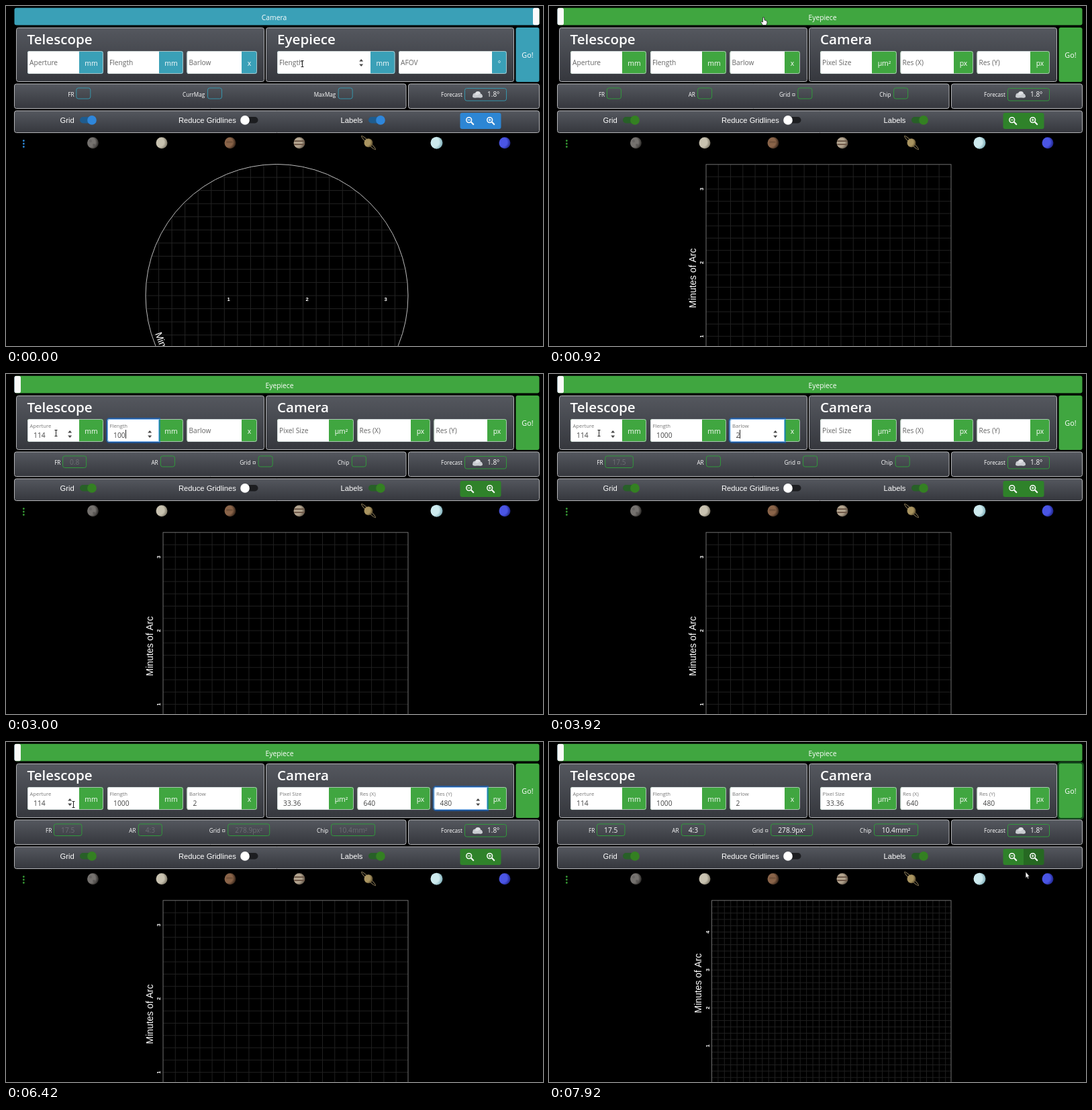
Animation, 800 px wide and 506 px high, one loop 8000 ms. Source, as an HTML page with a canvas:

```html
<!DOCTYPE html>
<html lang="en">
<head>
<meta charset="utf-8">
<title>Telescope calculator</title>
<style>
  html, body { margin: 0; width: 100%; height: 100%; overflow: hidden; background: #000; }
  canvas { display: block; width: 800px; height: 506px; }
</style>
</head>
<body>
<canvas id="stage" width="800" height="506"></canvas>
<script>
const ctx = document.getElementById('stage').getContext('2d');
const LOOP = 8000, STEP = 1000 / 12;
const SWITCH = 466, GO = 7080;
const UI = '"Open Sans", "Noto Sans", sans-serif';
const ARIAL = '"Liberation Sans", Arial, sans-serif';
const TEAL = [58, 160, 183], GREEN = [64, 166, 64];
const BLUE = [45, 134, 212], LEAF = [47, 130, 42];

// focus: [from, to]; typing starts at `start`, one key every `step` ms
const telescope = [
  { x: 32, mid: 109, end: 145, label: 'Aperture', unit: 'mm', text: '114', start: 1900, step: 170, focus: [1500, 2560] },
  { x: 151, mid: 228, end: 264, label: 'Flength', unit: 'mm', text: '1000', start: 2720, step: 130, focus: [2570, 3440] },
  { x: 269.5, mid: 351, end: 374, label: 'Barlow', unit: 'x', text: '2', start: 3720, step: 0, focus: [3450, 4090] }
];
const eyepiece = [
  { x: 404, mid: 543, end: 579.5, label: 'Flength', unit: 'mm' },
  { x: 585, mid: 724, end: 746, label: 'AFOV', unit: '°' }
];
const camera = [
  { x: 404, mid: 481, end: 518, label: 'Pixel Size', unit: 'µm²', text: '33.36', start: 4300, step: 130, focus: [4100, 4990] },
  { x: 523.5, mid: 603, end: 632, label: 'Res (X)', unit: 'px', text: '640', start: 5170, step: 125, focus: [5000, 5540] },
  { x: 637.5, mid: 717, end: 746, label: 'Res (Y)', unit: 'px', text: '480', start: 5650, step: 130, focus: [5550, GO] }
];
// time, x, y
const path = [
  [0, 441, 86], [90, 441, 86], [420, 347, 15], [800, 347, 15], [1330, 74, 88],
  [6340, 74, 88], [6420, 100, 93], [6950, 775, 74], [7420, 775, 78], [7800, 722, 172], [7900, 710, 193], [8001, 710, 193]
];

const clamp = v => Math.max(0, Math.min(1, v));
const ramp = (t, from, dur) => clamp((t - from) / dur);
const ease = u => u < .5 ? 2 * u * u : 1 - 2 * (1 - u) * (1 - u);
const rgb = c => `rgb(${c.map(Math.round)})`;
const mix = (a, b, k) => a.map((v, i) => v + (b[i] - v) * k);
const darken = (c, k) => c.map(v => v * k);
const inside = ([x, y], l, t, r, b) => x >= l && x <= r && y >= t && y <= b;

function pointer(t) {
  t = Math.max(0, t);
  const i = path.findIndex((p, n) => n + 1 < path.length && t < path[n + 1][0]);
  const [t0, x0, y0] = path[i], [t1, x1, y1] = path[i + 1];
  const k = ease((t - t0) / (t1 - t0));
  return [x0 + (x1 - x0) * k, y0 + (y1 - y0) * k];
}

function text(s, x, y, size, color = '#fff', align = 'left', font = UI, weight = 400) {
  ctx.font = `${weight} ${size}px ${font}`;
  ctx.textAlign = align;
  ctx.fillStyle = color;
  ctx.fillText(s, x, y);
}

function box(l, t, r, b, radius, fill, stroke, width = 1) {
  ctx.beginPath();
  ctx.roundRect(l, t, r - l, b - t, radius);
  if (fill) { ctx.fillStyle = fill; ctx.fill(); }
  if (stroke) { ctx.strokeStyle = stroke; ctx.lineWidth = width; ctx.stroke(); }
}

function line(x0, y0, x1, y1) {
  ctx.beginPath();
  ctx.moveTo(x0, y0);
  ctx.lineTo(x1, y1);
  ctx.stroke();
}

function disc(x, y, r, fill) {
  ctx.beginPath();
  ctx.arc(x, y, r, 0, 7);
  ctx.fillStyle = fill;
  ctx.fill();
}

function poly(points, fill, stroke) {
  ctx.beginPath();
  points.forEach(p => ctx.lineTo(...p));
  ctx.closePath();
  ctx.fillStyle = fill;
  ctx.fill();
  if (stroke) { ctx.strokeStyle = stroke; ctx.lineWidth = .8; ctx.stroke(); }
}

function turned(s, x, y, size, weight) {
  ctx.save();
  ctx.translate(x, y);
  ctx.rotate(-Math.PI / 2);
  text(s, 0, 0, size, '#fff', 'center', ARIAL, weight);
  ctx.restore();
}

function panel(l, t, r, b) {
  const g = ctx.createLinearGradient(0, t, 0, b);
  g.addColorStop(0, '#55585f');
  g.addColorStop(1, '#35373d');
  box(l + .5, t + .5, r - .5, b - .5, 3, g, '#b4b5b8');
}

function topBar(t, hover) {
  ctx.save();
  ctx.beginPath();
  ctx.roundRect(12.5, 2.7, 782, 25.8, 3);
  ctx.clip();
  ctx.translate(-781 * ease(ramp(t, SWITCH, 400)), 0);
  const shade = hover ? .81 : 1;
  ctx.fillStyle = rgb(darken(TEAL, shade));
  ctx.fillRect(12, 2, 783, 27);
  ctx.fillStyle = rgb(GREEN);
  ctx.fillRect(794, 2, 783, 27);
  text('Camera', 399.5, 20.5, 10.3, '#fff', 'center');
  text('Eyepiece', 1188.5, 20.5, 10.3, '#fff', 'center');
  box(785, 2.7, 803, 28.5, 3, '#fafafa');
  ctx.restore();
}

const typed = (f, t) => f.text && t >= f.start
  ? f.text.slice(0, f.step ? 1 + Math.floor((t - f.start) / f.step) : 1) : '';

function field(f, t, accent, mouse) {
  const value = typed(f, t);
  const focused = f.focus && t >= f.focus[0] && t < f.focus[1];
  box(f.x, 67, f.end, 101, 3, accent);
  box(f.x, 67, f.mid, 101, [3, 0, 0, 3], '#fff');
  box(f.x + .5, 67.5, f.end - .5, 100.5, 3, null, '#c4d0d0', .8);
  text(f.unit, (f.mid + f.end) / 2, 88.5, 10.4, '#fff', 'center');
  if (focused) {
    box(f.x - 1, 66, f.mid + 1, 102, [4, 0, 0, 4], null, 'rgba(0, 110, 240, .45)', 2);
    box(f.x + .5, 67.5, f.mid - .5, 100.5, [3, 0, 0, 3], null, '#80b8f4');
  }
  const lift = value ? 5 : 0;
  if (value) {
    text(f.label, f.x + 3.5, 79.5, 7.7, '#777');
    text(value, f.x + 9, 94.7, 10.3, '#444');
  } else {
    text(f.label, f.x + 3, 88.4, 10.2, '#666');
  }
  if (focused) {
    const keys = value ? f.start + (value.length - 1) * f.step : f.focus[0];
    if ((t - keys) % 1000 < 500) {
      ctx.font = `400 10.3px ${UI}`;
      ctx.fillStyle = '#222';
      ctx.fillRect(Math.round(f.x + 9 + ctx.measureText(value).width), 78 + lift, 1, 13);
    }
  }
  if (focused || inside(mouse, f.x, 67, f.mid, 101)) {
    const x = f.mid - 13.8, y = 84.5 + lift;
    poly([[x - 3, y - 2], [x, y - 5.5], [x + 3, y - 2]], '#444');
    poly([[x - 3, y + 2], [x, y + 5.5], [x + 3, y + 2]], '#444');
  }
}

// each stat: label, box offset, value, value width
function stats(t, accent) {
  let list;
  if (t < SWITCH) {
    list = [['FR', 12, '', 0], ['CurrMag', 37, '', 0], ['MaxMag', 36, '', 0]];
  } else {
    const flength = +typed(telescope[1], t), barlow = +typed(telescope[2], t) || 1;
    const ratio = flength ? (Math.floor(flength * barlow / 11.4) / 10).toFixed(1) : '';
    const full = typed(camera[2], t).length === 3;
    list = [
      ['FR', 12, ratio, ratio.length > 3 ? 20.5 : ratio ? 14 : 0],
      ['AR', 13.5, full ? '4:3' : '', 14],
      ['Grid ▫', 27.5, full ? '278.9px²' : '', 41],
      ['Chip', 21, full ? '10.4mm²' : '', 44]
    ];
  }
  list.forEach(s => { s.width = s[1] + 22 + (s[2] ? s[3] : 0); });
  const gap = (561 - list.reduce((sum, s) => sum + s.width, 0)) / list.length;
  let x = 24 + gap / 2;
  for (const s of list) {
    if (s[0] === 'Grid ▫') {
      text('Grid', x, 134.5, 8.2);
      ctx.strokeStyle = '#ddd';
      ctx.lineWidth = .8;
      ctx.strokeRect(x + 20, 130.5, 3.2, 3.2);
    } else text(s[0], x, 134.5, 8.2);
    const l = x + s[1], r = x + s.width;
    box(l + .5, 122, r - .5, s[2] ? 139.5 : 138, 3, null, accent);
    text(s[2], (l + r) / 2, 135.2, 10.2, t < GO ? '#6c6f74' : '#fff', 'center');
    x += s.width + gap;
  }
}

function forecast(accent) {
  text('Forecast', 648, 134.5, 8.1);
  box(683.5, 122.5, 745.5, 141, 3, null, accent);
  disc(699, 133, 3.6, '#c9ccd0');
  disc(703, 131, 4, '#dfe1e4');
  disc(706.5, 133.5, 3, '#c9ccd0');
  box(695, 132.5, 710, 136.5, 2, '#c9ccd0');
  text('1.8°', 717, 135.3, 10, '#fff');
}

function toggle(x, track, knob, on) {
  box(x, 165, x + 24, 174.5, 4.7, track);
  disc(x + (on ? 18 : 4.5), 169.9, 6.8, knob);
}

function magnifier(x, plus) {
  ctx.strokeStyle = '#fff';
  ctx.lineWidth = 1.5;
  ctx.beginPath();
  ctx.arc(x - 1.3, 169.6, 3.9, 0, 7);
  ctx.stroke();
  ctx.lineWidth = 2;
  line(x + 2, 172.8, x + 5.8, 176.7);
  ctx.lineWidth = 1;
  line(x - 3.3, 169.6, x + .7, 169.6);
  if (plus) line(x - 1.3, 167.6, x - 1.3, 171.6);
}

function controls(t, late) {
  const k = ramp(t, SWITCH, 110);
  const track = rgb(mix([31, 92, 142], [40, 96, 40], ramp(t, SWITCH, 250)));
  const knob = rgb(mix([47, 134, 218], [52, 128, 34], k));
  text('Grid', 80.5, 173.6, 11.2, '#fff', 'left', ARIAL);
  toggle(110, track, knob, true);
  text('Reduce Gridlines', 257, 173.6, 11.2, '#fff', 'left', ARIAL);
  toggle(351.5, '#1c1d20', '#fff', false);
  text('Labels', 498.5, 173.6, 11.2, '#fff', 'left', ARIAL);
  toggle(540, track, knob, true);

  const color = mix(BLUE, LEAF, ramp(t, 570, 300));
  const shade = (l, r) => rgb(darken(color, inside(late, l, 159, r, 183) ? .8 : 1));
  box(676.5, 159, 707, 183, [3, 0, 0, 3], shade(676, 707));
  box(707, 159, 737.5, 183, [0, 3, 3, 0], shade(707, 738));
  magnifier(691, false);
  magnifier(722, true);
  for (const y of [200.5, 205, 209.5]) disc(26.3, y, 1.4, rgb(mix(BLUE, [52, 150, 50], k)));
}

// sphere lit from the left
function ball(x, r, light, dark) {
  const g = ctx.createRadialGradient(x - r * .4, 202, 1, x - r * .4, 203, r * 1.5);
  g.addColorStop(0, light);
  g.addColorStop(.5, light);
  g.addColorStop(1, dark);
  disc(x, 203.7, r, g);
}

function planets() {
  ball(129.5, 8.5, '#75726f', '#1c1a18');
  disc(126, 201, 2, '#5e5c5a88');
  disc(131, 207, 2, '#4c4a4888');
  ball(232, 8.5, '#c8c2b0', '#6d6758');
  ball(334, 8.5, '#8a6449', '#21150e');
  box(328, 201, 338, 204, 1.5, '#5a402f66');
  ball(437, 8.5, '#b3a48f', '#4d4338');
  box(429, 200, 445, 202, 1, '#6d5a4a');
  box(429, 205, 445, 207, 1, '#705a4a');
  ctx.save();
  ctx.translate(540, 203.5);
  ctx.rotate(.77);
  ctx.strokeStyle = '#75674a';
  ctx.lineWidth = 1.1;
  ctx.beginPath();
  ctx.ellipse(0, 0, 14.5, 2, 0, 0, 7);
  ctx.stroke();
  ctx.restore();
  ball(540, 6.5, '#a99460', '#4a3d24');
  ball(641.5, 9, '#cdeaee', '#6c9fab');
  ball(743, 8.5, '#4a55e4', '#171b78');
}

function eyepieceView() {
  const cx = 403.5, cy = 431, r = 195.5, cell = 19.55;
  ctx.save();
  ctx.beginPath();
  ctx.arc(cx, cy, r, 0, 7);
  ctx.clip();
  ctx.strokeStyle = '#232323';
  ctx.lineWidth = 1;
  for (let i = 0; i <= 20; i++) {
    const d = i * cell;
    line(208 + d, 235, 208 + d, 506);
    line(208, 235.5 + d, 599, 235.5 + d);
  }
  ctx.restore();
  ctx.strokeStyle = '#bdbdbd';
  ctx.lineWidth = 1;
  ctx.beginPath();
  ctx.arc(cx, cy, r, 0, 7);
  ctx.stroke();
  for (let n = 1; n < 4; n++) text(n, 214.5 + n * 117, 439, 7.6, '#fff', 'center', ARIAL, 700);

  let angle = 2.84;
  for (const c of 'Minutes of Arc') {
    ctx.font = `400 14.5px ${ARIAL}`;
    const half = ctx.measureText(c).width / 2 / 190;
    angle -= half;
    ctx.save();
    ctx.translate(cx + 190 * Math.cos(angle), cy + 190 * Math.sin(angle));
    ctx.rotate(angle - Math.PI / 2);
    text(c, 0, 0, 14.5, '#fff', 'center', ARIAL);
    ctx.restore();
    angle -= half;
  }
}

function cameraView(t) {
  const done = t >= GO;
  const p = ramp(t, done ? GO : SWITCH, 350);
  const left = done ? 242.5 : 234, cell = done ? 9.41 : 18.27, first = done ? 4 : 3;
  const top = 235.8;
  ctx.save();
  ctx.globalAlpha = p;
  ctx.translate(0, 13.5 * (1 - p));
  ctx.lineWidth = 1;
  ctx.strokeStyle = '#202020';
  for (let x = left + cell; x < 598; x += cell) line(x, top, x, 520);
  for (let y = top + cell; y < 520; y += cell) line(left, y, 599, y);
  ctx.strokeStyle = '#707070';
  ctx.strokeRect(left, top, 599 - left, 365);
  const start = top + cell * (done ? 5 : 2);
  for (let n = first; n > 0; n--) {
    turned(n, left - 4, start + (first - n) * cell * 6, 7.4, 700);
  }
  turned('Minutes of Arc', left - 15.5, done ? 359 : 405, 13.9, 400);
  ctx.restore();
}

function cursor(mouse) {
  const [x, y] = mouse;
  const at = pts => pts.map(([a, b]) => [x + a, y + b]);
  const overField = [...telescope, ...camera].some(f => inside(mouse, f.x, 67, f.mid, 101));
  if (inside(mouse, 13, 3, 795, 28) || inside(mouse, 759, 32, 795, 113) || inside(mouse, 676, 159, 738, 183)) {
    poly(at([[-2, -5], [0, -5], [.5, -1], [4, 0], [4.5, 3], [3, 6.5], [-2, 6.5], [-5, 2], [-4, 1], [-2, 2]]), '#fff', '#222');
  } else if (overField) {
    ctx.strokeStyle = '#222';
    ctx.lineWidth = 1;
    const c = Math.round(x) + .5;
    line(c, y - 4, c, y + 4.5);
    line(c - 2, y - 4.5, c + 2, y - 4.5);
    line(c - 2, y + 4.5, c + 2, y + 4.5);
  } else {
    poly(at([[0, 0], [0, 9.5], [2, 7.7], [3.4, 10.8], [4.9, 10], [3.6, 7.2], [6, 7]]), '#fff', '#111');
  }
}

function goButton(t, late) {
  const color = mix(TEAL, GREEN, ramp(t, 550, 200));
  const hover = inside(late, 759, 32, 795, 113);
  box(759.5, 32, 794.5, 113, 3, rgb(darken(color, hover ? .82 : 1)));
  if (t >= GO) box(758.3, 30.8, 795.7, 114.2, 4, null, 'rgba(40, 150, 60, .5)', 2.4);
  text('Go!', 777, 76.8, 10.8, '#fff', 'center');
}

function draw(t) {
  const mouse = pointer(t), late = pointer(t - 120);
  const isCamera = t >= SWITCH;
  const accent = rgb(isCamera ? GREEN : TEAL);
  const outline = isCamera ? '#319a3c' : '#3795ab';
  ctx.fillStyle = '#000';
  ctx.fillRect(0, 0, 800, 506);

  topBar(t, inside(mouse, 13, 3, 795, 28));
  panel(15, 32, 385, 113);
  panel(387, 32, 757, 113);
  text('Telescope', 31.5, 56.8, 20.6, '#fff', 'left', UI, 600);
  text(isCamera ? 'Camera' : 'Eyepiece', 404, 56.8, 20.6, '#fff', 'left', UI, 600);
  for (const f of [...telescope, ...(isCamera ? camera : eyepiece)]) field(f, t, accent, mouse);
  goButton(t, late);

  panel(12, 115.5, 596.5, 153);
  panel(599, 115.5, 795, 153);
  stats(t, outline);
  forecast(outline);
  panel(12, 155.5, 795, 189);
  controls(t, late);
  planets();
  if (isCamera) cameraView(t); else eyepieceView();
  cursor(mouse);
}

function tick() {
  const t = performance.now() % LOOP;
  draw(Math.floor((t + 4) / STEP) % 96 * STEP);
  requestAnimationFrame(tick);
}
tick();
</script>
</body>
</html>
```
